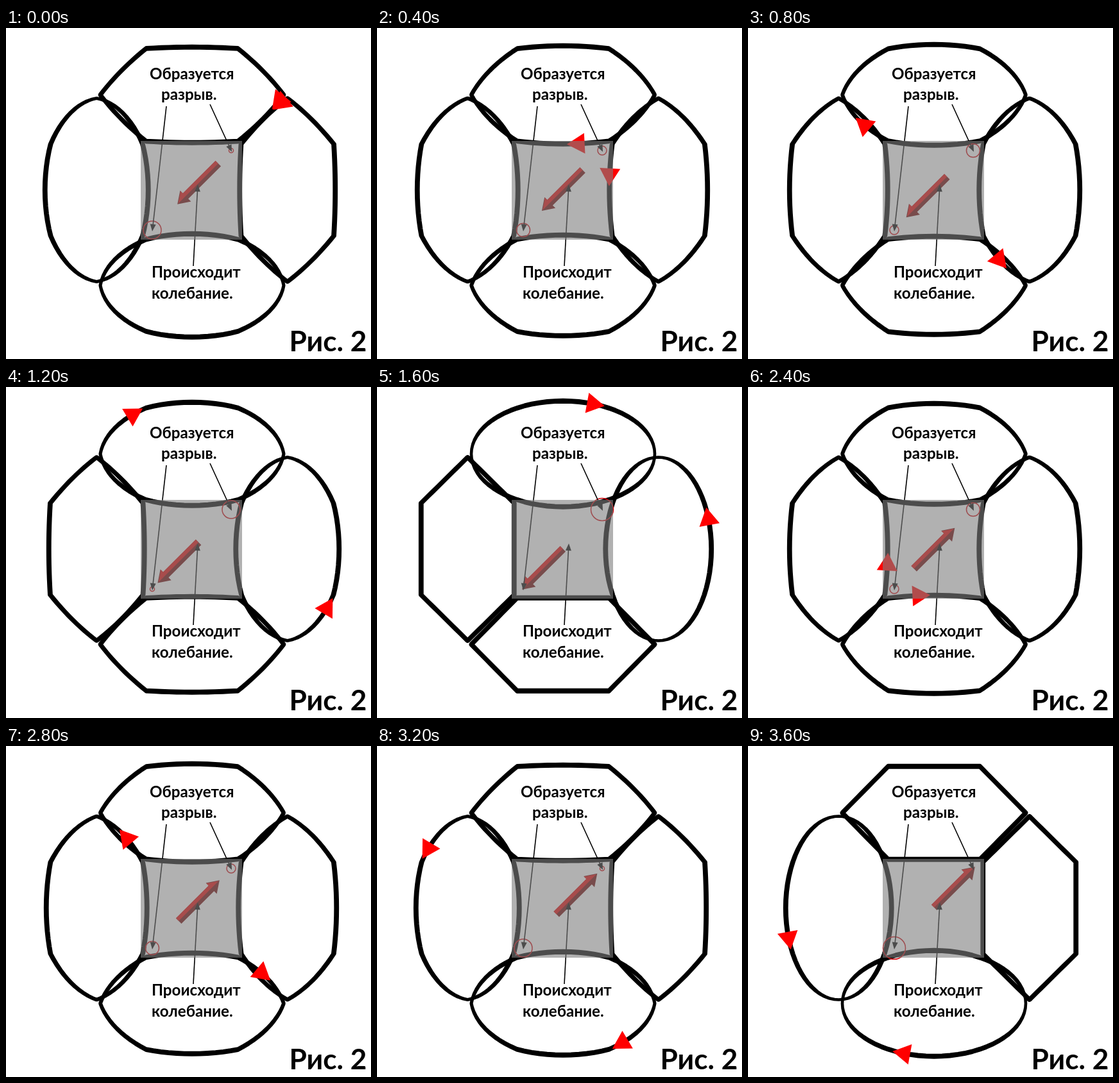
Recreate the animation shown at these times as an HTML page with a canvas. Size 569 by 516 pixels, loop 4 s.

```html
<!DOCTYPE html>
<html lang="ru">
<head>
<meta charset="utf-8">
<style>
html, body { margin: 0; width: 100%; height: 100%; overflow: hidden; background: #fff; }
canvas { display: block; }
</style>
</head>
<body>
<canvas id="stage" width="569" height="516"></canvas>
<script>
const ctx = document.getElementById('stage').getContext('2d');
const STEP = 400, HALF = 5, RAD = Math.PI / 180;
const LONG = 143, FLAT = 72.5, BULGE = 82.5;
const FONT = 'Lato, Carlito, "Open Sans", sans-serif';

const mix = (a, b, k) => a + (b - a) * k;

function trace(points) {
  ctx.beginPath();
  points.forEach(([x, y]) => ctx.lineTo(x, y));
  ctx.closePath();
}

function poly(points, fill) {
  trace(points);
  ctx.fillStyle = fill;
  ctx.fill();
}

// Closed curve between a hexagon (k = 0) and an ellipse (k = 1)
function outline(cx, cy, k, upright) {
  const corner = a => [LONG * Math.cos(a * RAD), FLAT * Math.sin(a * RAD) / Math.sin(60 * RAD)];
  const points = [];
  for (let a = 0; a < 360; a += 5) {
    const base = Math.floor(a / 60) * 60, f = (a - base) / 60;
    const p = corner(base), q = corner(base + 60);
    const u = mix(mix(p[0], q[0], f), LONG * Math.cos(a * RAD), k);
    const v = mix(mix(p[1], q[1], f), BULGE * Math.sin(a * RAD), k);
    points.push(upright ? [cx + v, cy + u] : [cx + u, cy + v]);
  }
  return points;
}

// The pen is flatter across the long axis
function ring(points, k, upright) {
  const pen = [mix(6.8, 4.6, k), 7.8];
  if (upright) pen.reverse();
  trace(points);
  ctx.save();
  ctx.scale(...pen);
  ctx.lineWidth = 1;
  ctx.lineJoin = 'round';
  ctx.strokeStyle = '#000';
  ctx.stroke();
  ctx.restore();
}

// Triangle on a closed curve at a share of its length, turned along it
function marker(points, share) {
  const legs = points.map((p, i) => {
    const q = points[(i + 1) % points.length];
    return { p, q, len: Math.hypot(q[0] - p[0], q[1] - p[1]) };
  });
  let rest = share % 1 * legs.reduce((sum, leg) => sum + leg.len, 0), i = 0;
  while (rest > legs[i].len) rest -= legs[i++].len;
  const { p, q, len } = legs[i];
  const x = mix(p[0], q[0], rest / len), y = mix(p[1], q[1], rest / len);
  const turn = Math.atan2(q[1] - p[1], q[0] - p[0]);
  poly([0, 120, 240].map(d => {
    const a = turn + d * RAD;
    return [x + 18.5 * Math.cos(a), y + 18.5 * Math.sin(a)];
  }), '#f00');
}

function gap(x, y, r) {
  if (r < 0.5) return;
  ctx.beginPath();
  ctx.arc(x, y, r, 0, 7);
  ctx.lineWidth = 1.5;
  ctx.strokeStyle = '#d00008';
  ctx.stroke();
}

function swingArrow(x, y, up) {
  const lit = up ? -1 : 1;
  ctx.save();
  ctx.translate(x, y);
  ctx.rotate((up ? -45 : 135) * RAD);
  poly([[-45, -6], [27, -6], [27, -12], [45, 0], [27, 12], [27, 6], [-45, 6]], '#700000');
  poly([[-45, lit * 6], [27, lit * 6], [27, lit * 11], [43, 0], [-45, 0]], '#e80000');
  ctx.restore();
}

function pointer(x1, y1, x2, y2) {
  const len = Math.hypot(x2 - x1, y2 - y1);
  ctx.save();
  ctx.translate(x1, y1);
  ctx.rotate(Math.atan2(y2 - y1, x2 - x1));
  ctx.beginPath();
  ctx.moveTo(0, 0);
  ctx.lineTo(len - 8, 0);
  ctx.lineWidth = 1.6;
  ctx.strokeStyle = '#000';
  ctx.stroke();
  poly([[len, 0], [len - 11, -4.5], [len - 11, 4.5]], '#000');
  ctx.restore();
}

function label(text, x, y, size) {
  ctx.font = `bold ${size}px ${FONT}`;
  ctx.fillStyle = '#000';
  ctx.fillText(text, x, y);
}

function draw(n) {
  const up = n >= HALF, phase = n % HALF;
  const k = Math.abs(n - 4) / 5;
  ctx.fillStyle = '#fff';
  ctx.fillRect(0, 0, 569, 516);

  const top = outline(290, 104.25, 1 - k, false);
  const right = outline(438.75, 252.5, 1 - k, true);
  const bottom = outline(290, 401.25, k, false);
  const left = outline(141.25, 252.5, k, true);
  ring(top, 1 - k, false);
  ring(right, 1 - k, true);
  ring(bottom, k, false);
  ring(left, k, true);

  const shift = phase * (up ? 10.5 : -10.25);
  swingArrow((up ? 280 : 299) + shift, (up ? 262 : 243) - shift, up);

  gap(351, 191, 17.5 * (1 - k));
  gap(228, 315, 17.5 * k);
  pointer(250, 122, 228, 317);
  pointer(318, 119, 352, 193);
  pointer(292, 371, 299, 244);

  // Two markers mirror each other, half a lap apart
  const lap = 0.015 + phase / HALF;
  marker(up ? left : top, lap);
  marker(up ? bottom : right, lap + 0.5);

  ctx.fillStyle = 'rgba(127,127,127,0.604)';
  ctx.fillRect(210, 176, 158, 154);

  label('Образуется', 224, 80, 24.2);
  label('разрыв.', 242, 112, 24.2);
  label('Происходит', 227, 389, 24.2);
  label('колебание.', 227, 422, 24.2);
  label('Рис. 2', 441.5, 504, 44.2);
}

const start = performance.now();
function tick(now) {
  draw(Math.floor(Math.max(0, now - start) / STEP) % (2 * HALF));
  requestAnimationFrame(tick);
}
draw(0);
requestAnimationFrame(tick);
</script>
</body>
</html>
```
